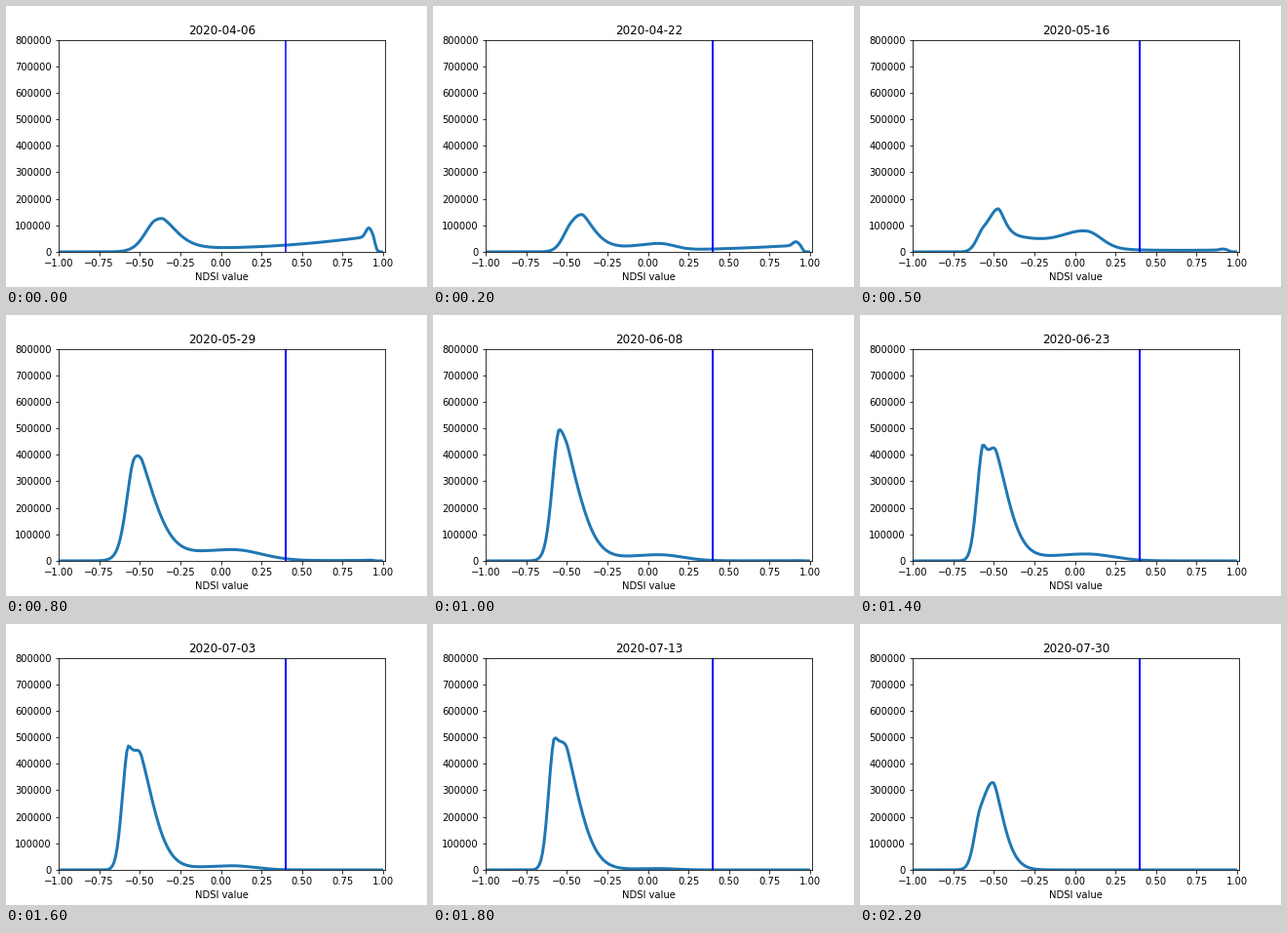
These frames come from a looping animation (432x288 px, 2300 ms). A matplotlib script:

```python
import numpy as np
import matplotlib.pyplot as plt
from matplotlib.animation import FuncAnimation

FRAMES = 23
START = np.datetime64("2020-04-06")
X = np.arange(-1, 0.995, 0.01)

# Key moments: step, days since start, then in thousands and NDSI units
# sharp peak (height, centre, right width),
# broad peak (height, centre, left width, right width),
# plateau (height, width).
POSES = np.array([
    (0, 0, 20, -.42, .06, 112, -.36, .13, .125, 0, .13),
    (5, 40, 76, -.56, .48, 92, -.47, .075, .055, 60, .13),
    (8, 53, 110, -.545, .05, 345, -.49, .1, .142, 42, .25),
    (12, 73, 365, -.565, .04, 420, -.5, .08, .119, 4, .15),
    (14, 78, 290, -.572, .042, 400, -.49, .08, .118, 26, .23),
    (18, 98, 340, -.582, .05, 420, -.5, .08, .125, 5, .15),
    (22, 115, 108, -.59, .06, 310, -.5, .09, .092, 0, .15)])


def hump(height, centre, left, right, power=2):
    """Bell with its own width and falloff on the right side."""
    d = X - centre
    return height * np.where(d < 0, np.exp(-(d / left) ** 2),
                             np.exp(-(abs(d) / right) ** power))


def rise(x0, width):
    return (1 + np.tanh((X - x0) / (2 * width))) / 2


def snow(amount):
    ramp = 15 + 42 * np.clip(X + .1, 0, None) ** 2
    spike = hump(33, .91, .025, .025)
    return amount * (ramp + spike) * rise(-.35, .03) * (1 - rise(.95, .006))


def state(i):
    """Day offset and histogram at step i."""
    day, h1, c1, r1, h2, c2, l2, r2, h3, w3 = (
        np.interp(i, POSES[:, 0], col) for col in POSES[:, 1:].T)
    l1 = .045 + .028 * .9 ** i
    total = (hump(h1, c1, l1, r1, 1.5) + hump(h2, c2, l2, r2, 1.5)
             + hump(h3, .07, 1.5 * w3, w3) + snow(.65 ** i))
    return int(round(day)), 1000 * total


fig, ax = plt.subplots(figsize=(6, 4), dpi=72)
fig.subplots_adjust(left=0.125, right=0.9, bottom=0.125, top=0.88)
ax.set(xlim=(-1, 1.01), ylim=(0, 800000), xlabel="NDSI value")
title = ax.set_title("")
curve, = ax.plot(X, 0 * X, lw=3)
# The threshold is redrawn each step, so its soft edges build up.
marks = [ax.axvline(0.4, color="blue") for _ in range(5)]


def update(i):
    day, counts = state(i)
    curve.set_ydata(counts)
    title.set_text(str(START + day))
    for n, mark in enumerate(marks):
        mark.set_visible(n <= i)
    return curve, title, *marks


anim = FuncAnimation(fig, update, frames=FRAMES, interval=100,
                     repeat=True, repeat_delay=0)
plt.show()
```
